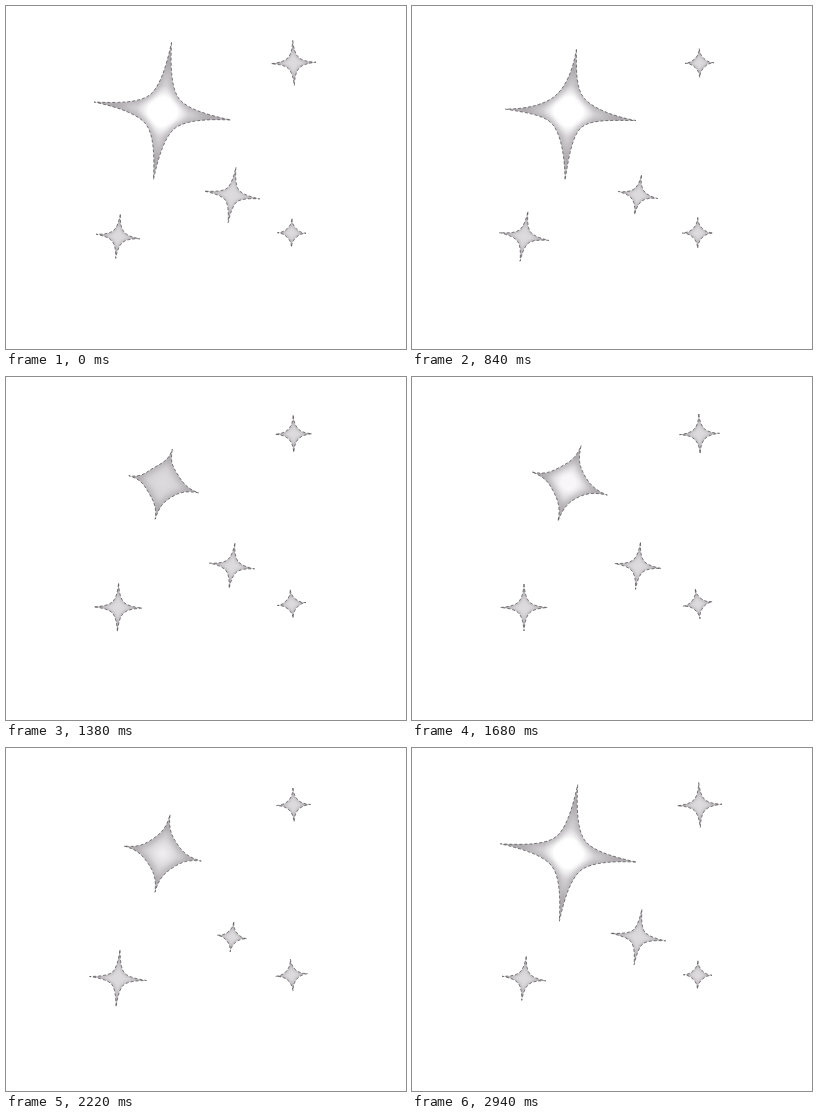
Recreate the animation shown at these times as an HTML page with a canvas. Size 400x343 px, loop 2970 ms.

```html
<!DOCTYPE html>
<html lang="en">
<head>
<meta charset="utf-8">
<title>Twinkling stars</title>
<style>
  html, body { margin: 0; width: 100%; height: 100%; overflow: hidden; background: #fff; }
  canvas { display: block; width: 400px; height: 343px; }
</style>
</head>
<body>
<canvas id="sky" width="400" height="343"></canvas>
<script>
const LOOP = 2970;
const BEAT = LOOP / 3;
const ctx = document.getElementById('sky').getContext('2d');

// Smooth looping curve through values at the given times.
function curve(times, values, period) {
  const n = times.length;
  const time = i => times[(i + n) % n] + Math.floor(i / n) * period;
  const value = i => values[(i + n) % n];
  const slope = i => {
    const before = value(i) - value(i - 1), after = value(i + 1) - value(i);
    if (before * after <= 0) return 0;
    const s0 = before / (time(i) - time(i - 1)), s1 = after / (time(i + 1) - time(i));
    return 2 * s0 * s1 / (s0 + s1);
  };
  return ms => {
    const t = ms % period;
    let i = n - 1;
    while (i > 0 && times[i] > t) i--;
    const h = time(i + 1) - time(i), u = (t - time(i)) / h;
    const u2 = u * u, u3 = u2 * u;
    return value(i) * (2 * u3 - 3 * u2 + 1) + value(i + 1) * (3 * u2 - 2 * u3)
      + h * (slope(i) * (u3 - 2 * u2 + u) + slope((i + 1) % n) * (u3 - u2));
  };
}

const drift = (...v) => curve([0, 390, 840, 1110, 1680, 2220], v, LOOP);
const pulse = (...v) => curve([0, 120, 240, 390, 570, 690, 840], v, BEAT);
const still = () => 0;

const stars = [
  {
    x: 156.5, y: 105.5, waist: [13, 0.115], shade: 4.5, blur: 3,
    reach: pulse(69, 66, 39.5, 36, 36, 39.5, 65.5),
    angle: drift(7.5, 5.5, 5, 9, 17, 11),
    dx: drift(0, 1, 2.2, 1.5, 1, 0), dy: drift(-0.5, 2.5, 3.3, 2.5, 1, 0),
    glow: pulse(1, 1, 0.25, 0, 0.15, 0.6, 1)
  },
  small(287.5, 57, drift(22.5, 17.5, 14.5, 16.5, 20, 17), drift(-2, -2, -1, 0, -2, -2)),
  small(226, 189, drift(28, 22, 20, 21.5, 23.5, 15), drift(8, 9, 10, 9, 6, 7)),
  small(112, 230.5, drift(22, 24.5, 25, 25, 23.5, 28.5), drift(6, 9, 9, 4, 0, 4)),
  small(285.7, 227, drift(14.3, 15.5, 15.5, 14, 15, 16), drift(1, 0, 0, -2, -9, -5))
];

function small(x, y, reach, angle) {
  return { x, y, reach, angle, waist: [4, 0.16], shade: 1.6, blur: 1.6,
           dx: still, dy: still, glow: still };
}

function outline(reach, waist, angle, dx, dy) {
  const path = new Path2D();
  const at = (deg, r, ox = 0, oy = 0) => {
    const a = (deg + angle) * Math.PI / 180;
    return [ox + r * Math.cos(a), oy + r * Math.sin(a)];
  };
  path.moveTo(...at(-90, reach, dx, dy));
  for (let a = -90; a < 270; a += 90) {
    const dip = at(a + 45, waist);
    path.bezierCurveTo(...at(a + 2.5, reach * 0.66, dx, dy),
                       ...at(a - 45, waist * 0.62, ...dip), ...dip);
    path.bezierCurveTo(...at(a + 135, waist * 0.62, ...dip),
                       ...at(a + 87.5, reach * 0.66, dx, dy),
                       ...at(a + 90, reach, dx, dy));
  }
  path.closePath();
  return path;
}

function drawStar(s, t) {
  const reach = s.reach(t), glow = s.glow(t);
  const path = outline(reach, s.waist[0] + s.waist[1] * reach, s.angle(t), s.dx(t), s.dy(t));
  const core = 222 + 33 * Math.sqrt(Math.max(0, glow));
  const light = `rgb(${core},${core - 3 * (1 - glow)},${core})`;
  const fill = ctx.createRadialGradient(0, 0, 0, 0, 0, 12 + 14 * glow);
  fill.addColorStop(0, light);
  fill.addColorStop(0.55 * glow, light);
  fill.addColorStop(1, '#d8d5d8');

  ctx.save();
  ctx.translate(s.x, s.y);
  ctx.save();
  ctx.clip(path);
  ctx.fillStyle = fill;
  ctx.fill(path);
  ctx.filter = `blur(${s.blur}px)`;
  ctx.strokeStyle = '#a39fa3';
  ctx.lineWidth = s.shade;
  ctx.stroke(path);
  ctx.restore();

  // Broken dark rim.
  ctx.lineJoin = 'bevel';
  ctx.strokeStyle = 'rgba(70,68,70,.85)';
  ctx.lineWidth = 0.8;
  ctx.setLineDash([3, 2]);
  ctx.stroke(path);
  ctx.restore();
}

const start = performance.now();
function frame() {
  const t = (performance.now() - start) % LOOP;
  ctx.fillStyle = '#fff';
  ctx.fillRect(0, 0, 400, 343);
  for (const s of stars) drawStar(s, t);
  requestAnimationFrame(frame);
}
frame();
</script>
</body>
</html>
```
